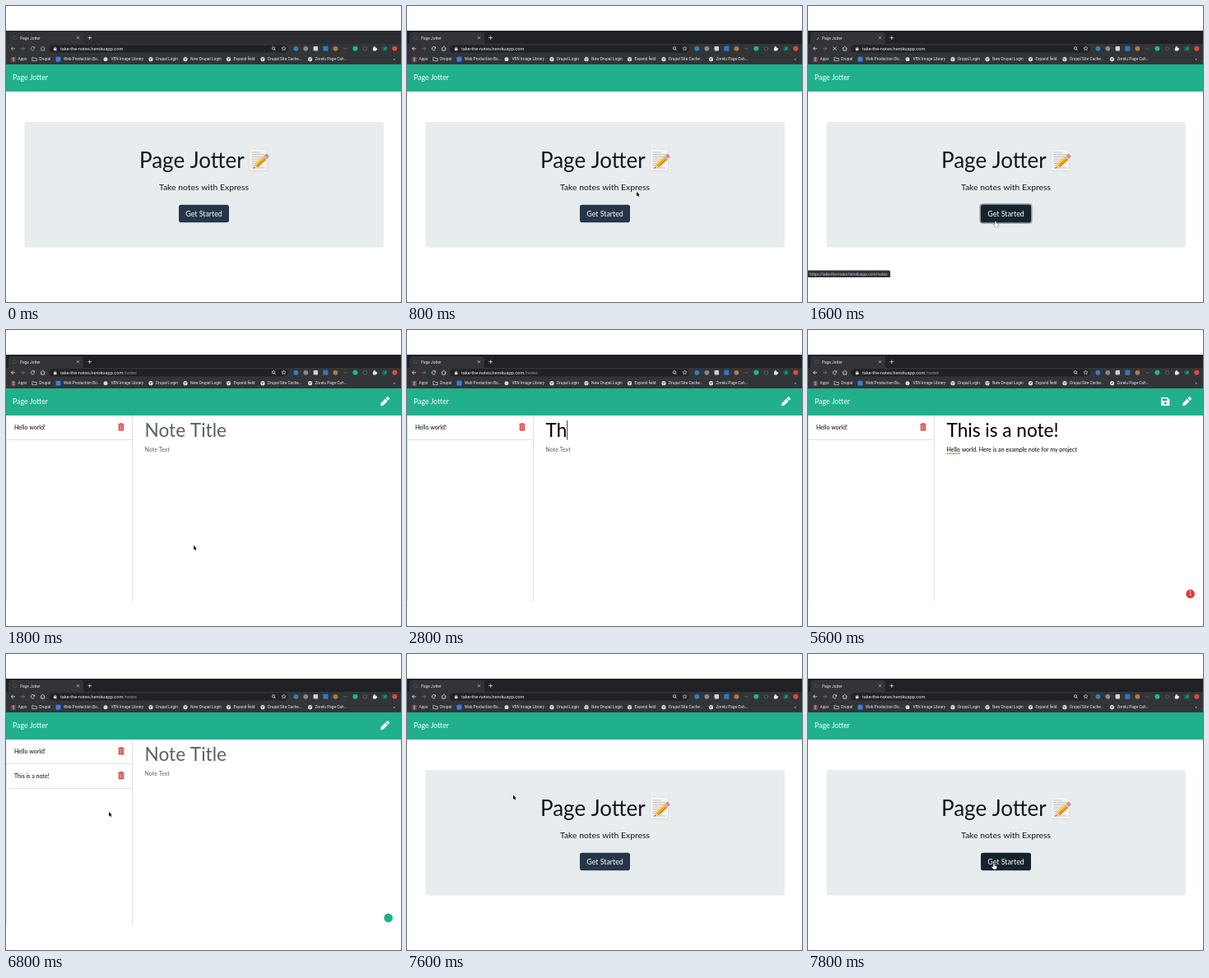
Recreate the animation shown at these times as an HTML page with a canvas. Size 480x360 px, loop 8000 ms.

```html
<!DOCTYPE html>
<html lang="en">
<head>
<meta charset="utf-8">
<title>Page Jotter</title>
<style>
  html, body { margin: 0; width: 100%; height: 100%; overflow: hidden; background: #fff; }
  canvas { display: block; width: 480px; height: 360px; }
</style>
</head>
<body>
<canvas id="stage"></canvas>
<script>
const LOOP = 8000, STEP = 200;
const BRAND = 'Page Jotter';
const HOST = 'take-the-notes.herokuapp.com';
const TITLE = 'This is a note!';
const BODY = 'Hello world. Here is an example note for my project';
const LATO = 'Lato, sans-serif', UI = 'Roboto, sans-serif';
const GREEN = '#20b08c', RED = '#de3735', ICON = '#d8dadd';

const canvas = document.getElementById('stage');
const g = canvas.getContext('2d');
const ratio = window.devicePixelRatio || 1;
canvas.width = 480 * ratio;
canvas.height = 360 * ratio;

// Pointer path: time, x, y
const PATH = [
  [600, 330, 190], [1000, 228, 262], [1800, 228, 262], [2400, 190, 124],
  [5800, 200, 150], [6200, 434, 88], [6400, 434, 88], [6800, 125, 192],
  [7200, 32, 88], [7400, 32, 88], [7800, 226, 255]
];

const within = (t, a, b) => t >= a && t < b;
const clamp = v => Math.max(0, Math.min(1, v));
const ease = v => v * v * (3 - 2 * v);

function rect(x, y, w, h, color) {
  g.fillStyle = color;
  g.fillRect(x, y, w, h);
}

function round(x, y, w, h, r, color) {
  g.fillStyle = color;
  g.beginPath();
  g.roundRect(x, y, w, h, r);
  g.fill();
}

function disc(x, y, r, color) {
  g.fillStyle = color;
  g.beginPath();
  g.arc(x, y, r, 0, 7);
  g.fill();
}

function ring(x, y, r, color, from = 0, to = 7, width = 0.8) {
  g.strokeStyle = color;
  g.lineWidth = width;
  g.beginPath();
  g.arc(x, y, r, from, to);
  g.stroke();
}

function trace(points) {
  g.beginPath();
  for (let i = 0; i < points.length; i += 2) g.lineTo(points[i], points[i + 1]);
}

function line(points, color, width = 0.8) {
  trace(points);
  g.strokeStyle = color;
  g.lineWidth = width;
  g.stroke();
}

function poly(points, color) {
  trace(points);
  g.closePath();
  g.fillStyle = color;
  g.fill();
}

function text(str, x, y, size, color, font = LATO, weight = 400) {
  g.font = `${weight} ${size}px ${font}`;
  g.fillStyle = color;
  g.fillText(str, x, y);
  return g.measureText(str).width;
}

function centered(str, x, y, size, color, weight) {
  g.textAlign = 'center';
  text(str, x, y, size, color, LATO, weight);
  g.textAlign = 'left';
}

function at(x, y, draw) {
  g.save();
  g.translate(x, y);
  draw();
  g.restore();
}

function pointer(t) {
  if (!within(t, 600, 2600) && t < 5800) return null;
  let i = 0;
  while (i < PATH.length - 2 && t >= PATH[i + 1][0]) i++;
  const [t0, x0, y0] = PATH[i], [t1, x1, y1] = PATH[i + 1];
  const k = ease(clamp((t - t0) / (t1 - t0)));
  return { x: x0 + (x1 - x0) * k, y: y0 + (y1 - y0) * k };
}

function stateAt(t) {
  const home = t < 1800 || t >= 7600;
  const p = pointer(t);
  const over = (x, y, w, h) => p && p.x > x && p.x < x + w && p.y > y && p.y < y + h;
  const onButton = home && over(210, 242, 61, 21);
  const onLink = over(6, 80, 46, 13) || over(428, 81, 12, 12);
  const saved = t >= 6600;
  const titleLen = Math.round(15 * clamp((t - 2675) / 900));
  const bodyLen = t < 4000 ? 0 : Math.round(1 + (BODY.length - 1) * clamp((t - 4000) / 1200));
  return {
    t, home, p, onButton, saved,
    hand: onButton || (!home && onLink),
    active: t >= 400,
    loading: within(t, 1400, 1800) || within(t, 7400, 7600),
    title: saved ? '' : TITLE.slice(0, titleLen),
    body: saved ? '' : BODY.slice(0, bodyLen),
    status: within(t, 1400, 1800) ? '/notes' : within(t, 7200, 7600) ? '/' : ''
  };
}

function globe(x, y) {
  disc(x, y, 2.6, '#e9eaec');
  line([x - 1.7, y - 0.9, x, y - 0.3, x - 0.4, y + 1.5], '#4b4d51', 0.8);
  line([x + 0.8, y - 1.8, x + 1.5, y], '#4b4d51', 0.7);
}

function folder(x, y) {
  line([x - 2.7, y + 2, x - 2.7, y - 2, x - 0.6, y - 2, x, y - 1.2, x + 2.7, y - 1.2,
    x + 2.7, y + 2, x - 2.7, y + 2], ICON, 0.7);
}

function bookmarks() {
  const y = 64.7, label = (str, x) => text(str, x, 66.4, 4.8, '#e6e7e9', UI);
  for (let i = 0; i < 9; i++) {
    const color = ['#e2574c', '#e9eaec', '#e2574c'][i % 3];
    rect(6.4 + (i % 3) * 1.9, 62.4 + Math.floor(i / 3) * 1.9, 1.3, 1.3, color);
  }
  label('Apps', 14.5);
  folder(34.5, y);
  label('Drupal', 40.3);
  round(60.5, 61.8, 6, 6, 1, '#3b7de0');
  label('Web Production Bo...', 70);
  disc(121, y, 2.5, '#d5d9df');
  label('VEN Image Library', 127.5);
  [['Drupal Login', 176], ['New Drupal Login', 218], ['Expand field', 270.5],
   ['Drupal Site Cache...', 312], ['Zorelu Page Cah...', 369.5]].forEach(([str, x]) => {
    globe(x, y);
    label(str, x + 6);
  });
  label('»', 470.5);
}

function extensions() {
  const y = 51.8;
  ring(325, y - 0.4, 1.7, ICON);
  line([326.2, y + 0.9, 327.7, y + 2.4], ICON);
  const star = [];
  for (let i = 0; i <= 10; i++) {
    const r = i % 2 ? 1.2 : 2.8, a = i * Math.PI / 5 - Math.PI / 2;
    star.push(337.5 + r * Math.cos(a), y + r * Math.sin(a));
  }
  line(star, ICON, 0.6);
  disc(352.3, y, 2.9, '#2b83c6');
  disc(364.3, y, 2.9, '#85888d');
  round(373.6, y - 2.7, 5.4, 5.4, 0.8, '#cfd2d6');
  round(385.3, y - 3, 6, 6, 0.6, '#2e78c8');
  disc(400.4, y, 2.9, '#b57b40');
  line([410.2, y - 1, 412.3, y + 1.2, 414.4, y - 1], '#6e7175', 0.9);
  disc(424.4, y, 3, '#19b887');
  ring(436.4, y, 2.3, '#65686c');
  round(445.9, y - 1.4, 4, 4, 0.4, '#e8eaed');
  disc(447.8, y - 1.8, 1.1, '#e8eaed');
  disc(450.2, y + 0.5, 1.1, '#e8eaed');
  disc(460.3, y, 3.2, '#0f6a50');
  text('J', 459.2, y + 1.6, 4.4, '#d6efe6', UI);
  disc(472.3, y, 3, '#e1483f');
}

function browser(s) {
  rect(0, 30, 480, 16, s.active ? '#202124' : '#2b2d30');
  rect(0, 46, 480, 25, '#323438');
  round(3, 32, 91, 16, [4, 4, 0, 0], '#323438');
  if (s.loading) ring(10.5, 38.7, 2.2, '#b8bec6', s.t / 130, s.t / 130 + 1.7);
  else ring(10.5, 38.7, 2.2, '#54575c', 0, 7, 0.7);
  text(BRAND, 17, 40.5, 4.8, '#e6e7e9', UI);
  line([86, 37.2, 89, 40.2], ICON, 0.7);
  line([89, 37.2, 86, 40.2], ICON, 0.7);
  line([99.3, 38.7, 104.1, 38.7], ICON);
  line([101.7, 36.3, 101.7, 41.1], ICON);

  const y = 51.8, nav = s.active ? '#e4e6e8' : '#b5b8bb';
  line([11, y, 6.4, y], nav);
  line([8.6, y - 2.2, 6.4, y, 8.6, y + 2.2], nav);
  line([18, y, 22.6, y], '#7a7d81');
  line([20.4, y - 2.2, 22.6, y, 20.4, y + 2.2], '#7a7d81');
  if (s.loading) {
    line([30.4, y - 2.1, 34.6, y + 2.1], nav);
    line([34.6, y - 2.1, 30.4, y + 2.1], nav);
  } else {
    ring(32.5, y, 2.2, nav, 0.5, 5.5);
    poly([35.1, y - 2.6, 35.1, y - 0.2, 32.8, y - 0.2], nav);
  }
  line([41.8, y, 44.7, y - 2.5, 47.6, y], nav);
  line([42.8, y - 0.5, 42.8, y + 2.3, 46.6, y + 2.3, 46.6, y - 0.5], nav);

  round(52, 47.6, 291, 8.8, 4.4, '#202124');
  rect(57.9, 51.3, 3.6, 2.9, ICON);
  ring(59.7, 51.2, 1.1, ICON, Math.PI, 2 * Math.PI, 0.6);
  const w = text(HOST, 66, 53.9, 5.65, '#eceef0', UI);
  if (!s.home) text('/notes', 66 + w, 53.9, 5.65, '#989ca1', UI);
  extensions();
  bookmarks();
}

function memo() {
  round(295.5, 174.7, 22, 26, 0.8, '#d8d6d3');
  round(296, 174.7, 21, 25.3, 0.6, '#f5f3ef');
  for (let i = 0; i < 8; i++) {
    const y = 178 + i * 2.7;
    line([298.5, y, 309 + (i * 5) % 6, y], '#aaa9a8', 0.7);
  }
  at(300.5, 197.5, () => {
    g.rotate(-0.74);
    poly([0, 0, 5, -2.6, 5, 2.6], '#ecc795');
    poly([0, 0, 1.7, -0.9, 1.7, 0.9], '#3c3733');
    rect(5, -2.6, 13.5, 5.2, '#f4a91f');
    rect(5, -2.6, 13.5, 1.6, '#ffd04a');
    rect(5, 1.2, 13.5, 1.4, '#d57c15');
    rect(18.5, -2.6, 2.3, 5.2, '#b9bcc0');
    round(20.8, -2.6, 3.3, 5.2, [0, 1.5, 1.5, 0], '#e98080');
  });
}

function homePage(s) {
  round(22.5, 141, 436.5, 152.5, 3, '#e7ecee');
  text(BRAND, 162, 197, 26, '#15181b');
  memo();
  centered('Take notes with Express', 240.5, 224.2, 10.4, '#15181b');
  const focused = within(s.t, 1400, 1800);
  if (focused) round(208.4, 240.3, 64.2, 24.4, 4, '#8d989f');
  round(210, 241.8, 61, 21.4, 2.8, s.onButton ? '#16232d' : '#25364a');
  centered('Get Started', 240.5, 255.6, 8.8, '#fff');
}

function trash(x, y) {
  at(x, y, () => {
    rect(-3.7, -4, 7.4, 1.1, RED);
    rect(-1.4, -4.7, 2.8, 1, RED);
    round(-3.1, -2.4, 6.2, 7, [0, 0, 0.9, 0.9], RED);
    for (const dx of [-1.6, 0, 1.6]) rect(dx - 0.25, -1.4, 0.5, 4.8, '#fff');
  });
}

function saveIcon() {
  poly([429.3, 82, 437, 82, 439.4, 84.4, 439.4, 92, 429.3, 92], '#fff');
  rect(430.8, 83.4, 5.6, 2.7, GREEN);
  disc(434.3, 89, 1.5, GREEN);
}

function pencilIcon() {
  at(455, 92.3, () => {
    g.rotate(-Math.PI / 4);
    poly([0.2, 0, 2.8, -2, 10.3, -2, 10.3, 2, 2.8, 2], '#fff');
    round(11.1, -2, 3.2, 4, [0, 1, 1, 0], '#fff');
  });
}

function notesPage(s) {
  rect(0, 104, 0.7, 226, '#d9dadb');
  rect(153, 104, 0.8, 226, '#d9dadb');
  const items = s.saved ? ['Hello world!', TITLE] : ['Hello world!'];
  items.forEach((str, i) => {
    const y = 104 + i * 29.7;
    text(str, 10, y + 17.2, 7.05, '#15181b', LATO, 500);
    trash(139.9, y + 14);
    rect(0, y + 29.2, 153, 0.8, '#d9dadb');
  });

  const tw = text(s.title || 'Note Title', 168.6, 130, 22.6, s.title ? '#000' : '#5d6064');
  const bw = text(s.body || 'Note Text', 168.6, 148.1, 7.03, s.body ? '#000' : '#5d6064');
  if (within(s.t, 2400, 3800)) rect(168.6 + (s.title && tw), 110, 0.8, 23.5, '#000');
  if (within(s.t, 3800, 5400)) rect(168.6 + (s.body && bw), 141.5, 0.6, 8.3, '#000');
  if (s.body) saveIcon();
  pencilIcon();

  const checked = within(s.t, 5400, 6600);
  if (checked) rect(168.6, 149.8, 16.4, 0.8, RED);
  if (s.t >= 3600) disc(464.6, 320.9, 5.3, checked ? RED : '#19b088');
  if (checked) centered('1', 464.6, 323.3, 6.6, '#fff');
}

function statusBar(path) {
  round(0, 321.4, path === '/' ? 88 : 100, 8.6, [0, 2, 0, 0], '#303236');
  text('https://' + HOST + path, 2, 327.5, 4.8, '#c3c5c8', UI);
}

function cursor(s) {
  if (!s.p) return;
  at(s.p.x, s.p.y, () => {
    trace(s.hand
      ? [-0.7, 0, 0.5, 0, 0.7, 2.2, 3.5, 3, 3.3, 5, 2.4, 6.7, -0.8, 6.7, -2.8, 3.9, -2, 3.2, -0.7, 4.1]
      : [0, 0, 0, 5.2, 1.2, 4.2, 2.1, 6, 3.1, 5.5, 2.3, 3.8, 3.8, 3.7]);
    g.closePath();
    g.lineWidth = s.hand ? 0.7 : 1;
    g.lineJoin = 'round';
    g.strokeStyle = s.hand ? '#111' : '#fff';
    g.stroke();
    g.fillStyle = s.hand ? '#fff' : '#000';
    g.fill();
  });
}

function draw(now) {
  const s = stateAt(Math.floor((now % LOOP) / STEP) * STEP);
  g.setTransform(ratio, 0, 0, ratio, 0, 0);
  g.lineJoin = 'miter';
  rect(0, 0, 480, 360, '#fff');
  browser(s);
  rect(0, 71, 480, 33, GREEN);
  text(BRAND, 8, 90.2, 8.75, '#fff');
  if (s.home) homePage(s);
  else notesPage(s);
  if (s.status) statusBar(s.status);
  cursor(s);
}

const start = performance.now();
function tick() {
  draw(performance.now() - start);
  requestAnimationFrame(tick);
}
tick();
</script>
</body>
</html>
```
